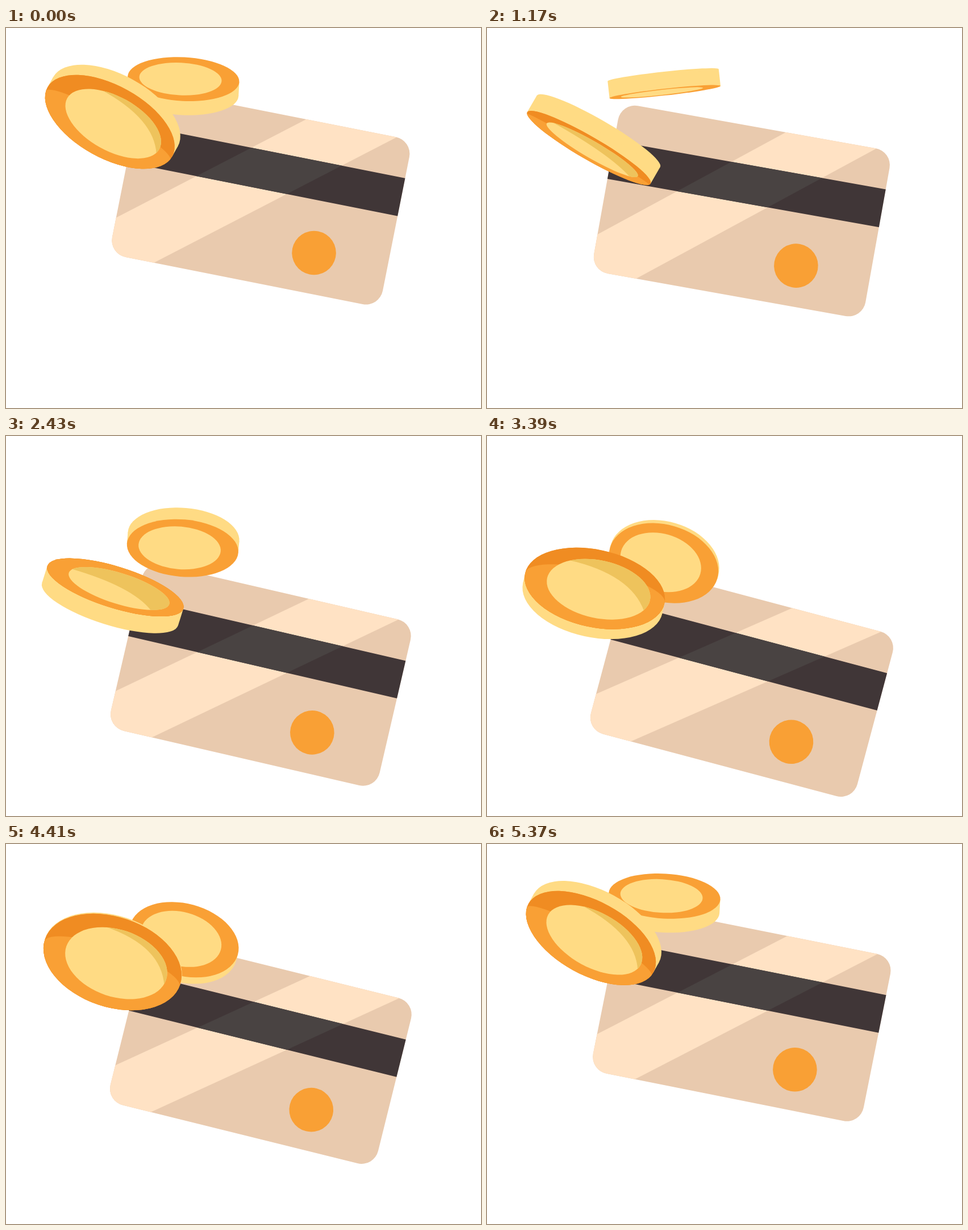
Write an HTML page with a canvas that moves like this. It is 836 by 670 pixels and loops after 5400 ms.

```html
<!DOCTYPE html>
<html lang="en">
<head>
<meta charset="utf-8">
<title>Card and coins</title>
<style>
  html, body { margin: 0; width: 100%; height: 100%; overflow: hidden; background: #fff; }
  canvas { display: block; }
</style>
</head>
<body>
<canvas id="stage" width="836" height="670"></canvas>
<script>
const ctx = document.getElementById('stage').getContext('2d');
const LOOP = 5400, STEP = 30, RAD = Math.PI / 180;
const ORANGE = '#f9a035', DARK_ORANGE = '#f08c22', YELLOW = '#ffdb84', SHADE = '#eec35c';

// Sine wave over one loop that reaches mean + amp at time peak.
const wave = (t, mean, amp, peak) => mean + amp * Math.cos((t - peak) / LOOP * 2 * Math.PI);

// Angle in radians of a coin making half a turn per loop, edge-on at time edge.
const halfTurn = (t, edge) => ((t - edge) / LOOP % 1 + 1) % 1 * Math.PI;

function fill(color, draw) {
  ctx.fillStyle = color;
  ctx.beginPath();
  draw();
  ctx.fill();
}

const oval = (x, y, rx, ry) => ctx.ellipse(x, y, rx, ry, 0, 0, 2 * Math.PI);

function placed(x, y, degrees, draw) {
  ctx.save();
  ctx.translate(x, y);
  ctx.rotate(degrees * RAD);
  draw();
  ctx.restore();
}

// Runs draw inside an ellipse, scaled so that the ellipse is the unit circle.
function inOval(x, y, rx, ry, draw) {
  ctx.save();
  ctx.beginPath();
  oval(x, y, rx, ry);
  ctx.clip();
  ctx.translate(x, y);
  ctx.scale(rx, ry);
  draw();
  ctx.restore();
}

function card(t) {
  placed(448.4, wave(t, 366.2, -74.4, 358), wave(t, 12.5, -2.5, 890), () => {
    const band = () => {
      ctx.moveTo(53, -151);
      ctx.lineTo(215, -151);
      ctx.lineTo(-163, 151);
      ctx.lineTo(-325, 151);
    };
    ctx.beginPath();
    ctx.roundRect(-242.7, -150.2, 485.4, 300.4, 30);
    ctx.clip();
    fill('#e9caae', () => ctx.rect(-250, -160, 500, 320));
    fill('#ffe2c4', band);
    fill(ORANGE, () => oval(111, 78.2, 38.8, 38.8));
    ctx.beginPath();
    ctx.rect(-250, -82.2, 500, 68);
    ctx.clip();
    fill('#403637', () => ctx.rect(-250, -83, 500, 70));
    fill('#494342', band);
  });
}

// Rim lit from below left, with a curved shadow across the face.
function rimShadow(y, rx, ry, e) {
  const h = 0.04 + 0.12 * e;
  const k = Math.min(1, 0.38 - 0.15 * e + Math.max(0, -0.5 - e) * 1.3);
  inOval(0, y, rx, ry, () => {
    fill(DARK_ORANGE, () => ctx.rect(-1, -1, 2, 2));
    fill(ORANGE, () => {
      ctx.ellipse(0, h, 1, k, 0, Math.PI, 2 * Math.PI);
      ctx.lineTo(1, 1.1);
      ctx.lineTo(-1, 1.1);
    });
  });
}

function middleShadow(x, y, rx, ry, s, e) {
  const from = (-183 + 68 * s + 13 * e) * RAD;
  const to = (55 - 44 * s - 13 * e) * RAD;
  const mid = (from + to) / 2;
  const reach = Math.cos((to - from) / 2) + 0.7;
  inOval(x, y, rx, ry, () => fill(SHADE, () => {
    ctx.arc(0, 0, 1.02, from, to);
    ctx.quadraticCurveTo(reach * Math.cos(mid), reach * Math.sin(mid),
      1.02 * Math.cos(from), 1.02 * Math.sin(from));
  }));
}

function coin({ x, y, tilt, turn, rx, depth, thick, shift, shaded }) {
  const s = Math.sin(turn), e = Math.cos(turn);
  const ry = Math.max(0.01, depth * s);
  const face = thick * e / 2, half = Math.abs(face);
  const inner = [shift, face, rx * 0.738, ry * 0.745];
  placed(x, y, tilt, () => {
    fill(YELLOW, () => oval(0, -face, rx, ry));
    fill(YELLOW, () => ctx.rect(-rx, -half, 2 * rx, 2 * half));
    fill(ORANGE, () => oval(0, face, rx, ry));
    if (shaded) rimShadow(face, rx, ry, e);
    fill(YELLOW, () => oval(...inner));
    if (shaded) middleShadow(...inner, s, e);
  });
}

function draw(t) {
  ctx.fillStyle = '#fff';
  ctx.fillRect(0, 0, 836, 670);
  card(t);
  coin({
    x: 311.7, y: wave(t, 153.3, -68.3, 630), tilt: wave(t, 5.8, -12.1, 1146),
    turn: halfTurn(t, 1020), rx: 98.3, depth: 69, thick: 30, shift: -5.3
  });
  coin({
    x: 187.8, y: wave(t, 222.6, -67.3, 159), tilt: wave(t, 22, 9.8, 662),
    turn: Math.PI - halfTurn(t, 1610), rx: 125.5, depth: 79.5, thick: 35, shift: 6.8,
    shaded: true
  });
}

function tick() {
  const t = performance.now() % LOOP;
  draw(Math.floor(t / STEP) * STEP);
  requestAnimationFrame(tick);
}
tick();
</script>
</body>
</html>
```
